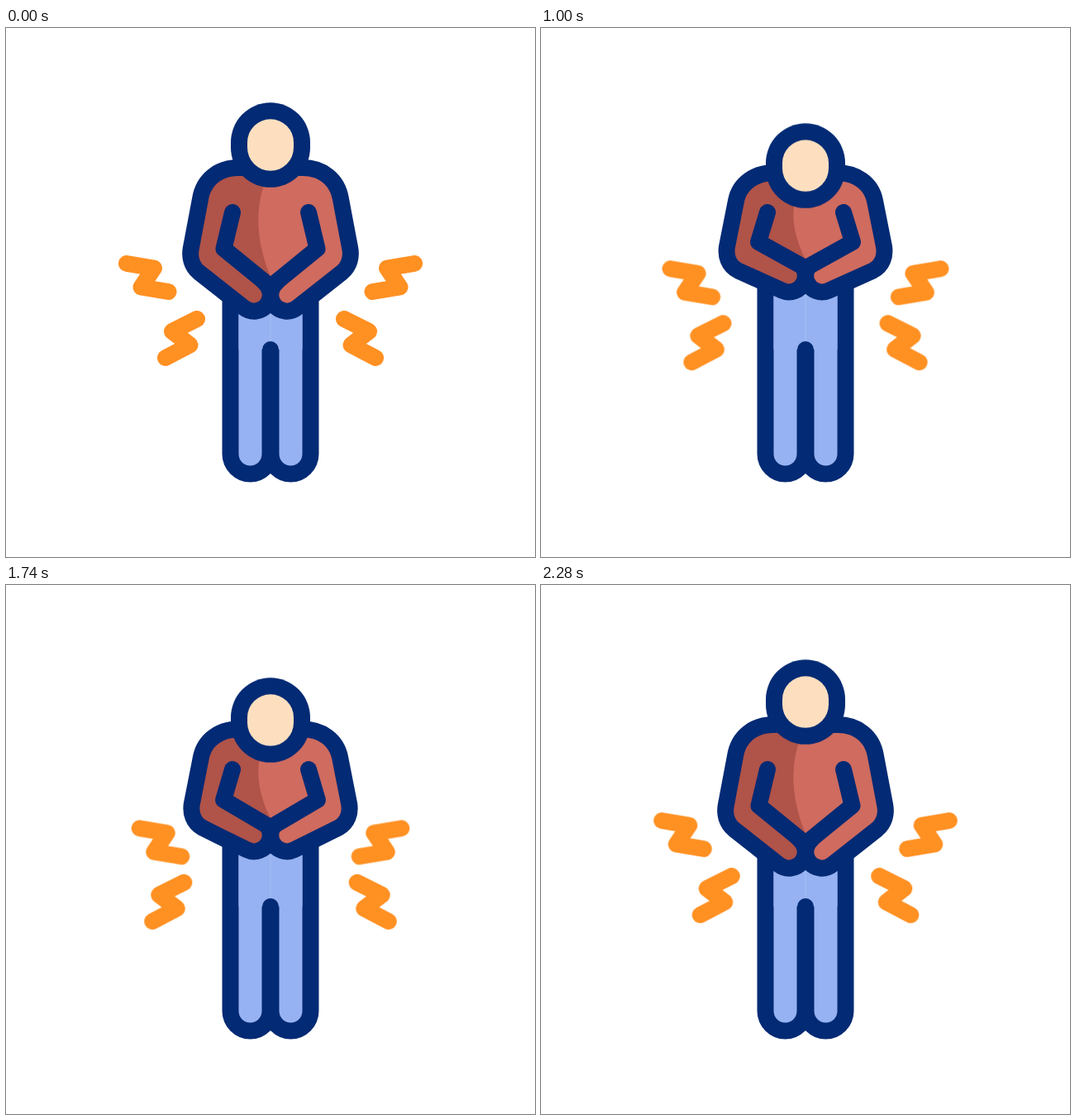
Animation, 640 px wide and 640 px high, one loop 2.4 s. Source, as an HTML page:

```html
<!DOCTYPE html>
<html lang="en">
<head>
<meta charset="utf-8">
<title>Abdominal pain icon</title>
<style>
  html, body { margin: 0; width: 100%; height: 100%; overflow: hidden; background: #fff; }
  svg { display: block; width: 100%; height: 100%; }

  :root {
    --navy: #032a74;
    --blue: #96b2f2;
    --red: #cf6b5f;
    --maroon: #b05349;
    --ease: cubic-bezier(.333, 0, .667, 1);
  }
  path, rect { fill: none; stroke-linecap: round; stroke-linejoin: round; }

  .half, .arm, .chest, .head, .bolt { animation: 2400ms var(--ease) infinite; }
  .half { animation-name: half; }
  .arm { animation-name: arm; stroke: var(--navy); stroke-width: 20; }
  .chest { animation-name: chest; fill: var(--red); }
  .head { animation-name: nod; }
  .bolt { animation-name: shake; stroke: #ff9022; stroke-width: 20; }

  .edge { stroke: var(--navy); stroke-width: 40; }
  .dark { fill: var(--maroon); }
  .light { fill: var(--red); }
  .upper { --dx: 34px; --dy: 20.4px; }
  .lower { --dx: -34px; --dy: 17px; }

  /* bend forward 200-1200 ms, hold, straighten 1500-2300 ms */
  @keyframes half {
    0%, 8.333%, 95.833%, 100% { d: path("M321 179H281C262 179 248 190 245 208L233.5 269C232.3 276 234 283 240 288L294 330.6A9.7 9.7 0 0 0 306 315.3L263.5 267L321 313Z"); }
    50%, 62.5% { d: path("M321 186H281C263 186 249 196 246 211L235 266C233.8 274 236.5 281 243 284L296.2 306A9.7 9.7 0 0 0 303.8 288L263 258L321 288Z"); }
  }
  @keyframes arm {
    0%, 8.333%, 95.833%, 100% { d: path("M274 223L263.5 267L320 313"); }
    50%, 62.5% { d: path("M274 223L263 258L320 288"); }
  }
  @keyframes chest {
    0%, 8.333%, 95.833%, 100% { d: path("M321 185H314C302 215 301 255 320 301H321Z"); }
    50%, 62.5% { d: path("M321 188H314C302 215 301 240 320 278H321Z"); }
  }
  @keyframes nod {
    0%, 8.333%, 95.833%, 100% { transform: translateY(0); }
    50%, 62.5% { transform: translateY(28px); }
  }
  @keyframes shake {
    0%, 8.333%, 35.833%, 65.417%, 95.833%, 100% { transform: translate(0, 0); }
    22.083%, 51.667%, 80.417% { transform: translate(var(--dx), var(--dy)); }
  }
</style>
</head>
<body>
<svg viewBox="0 0 640 640">
  <!-- legs -->
  <path d="M295.5 310V515.5M344.5 310V515.5" stroke="var(--navy)" stroke-width="68"/>
  <path d="M295.5 310V515.5M344.5 310V515.5" stroke="var(--blue)" stroke-width="28"/>
  <rect x="281.5" y="310" width="77" height="79" style="fill: var(--blue)"/>
  <path d="M320 310V380" stroke="#a6bdf4"/>
  <path d="M320 389V516" stroke="var(--navy)" stroke-width="20"/>

  <!-- torso -->
  <path class="half edge"/>
  <g transform="translate(640) scale(-1 1)"><path class="half edge"/></g>
  <path class="half dark"/>
  <g transform="translate(640) scale(-1 1)"><path class="half light"/></g>
  <path class="chest"/>

  <!-- arms and pain bolts, one group per side -->
  <g>
    <path class="arm"/>
    <path class="bolt upper" d="M146 285L179 290.5L163.5 313.5L196.5 319"/>
    <path class="bolt lower" d="M231 352L201 367L222.5 383.5L193 399"/>
  </g>
  <g transform="translate(640) scale(-1 1)">
    <path class="arm"/>
    <path class="bolt upper" d="M146 285L179 290.5L163.5 313.5L196.5 319"/>
    <path class="bolt lower" d="M231 352L201 367L222.5 383.5L193 399"/>
  </g>

  <!-- head -->
  <g class="head">
    <rect x="272" y="90.3" width="96" height="102.5" rx="48" style="fill: var(--navy)"/>
    <rect x="292" y="110.3" width="56" height="62.5" rx="28" style="fill: #fddfc0"/>
  </g>
</svg>
</body>
</html>
```
